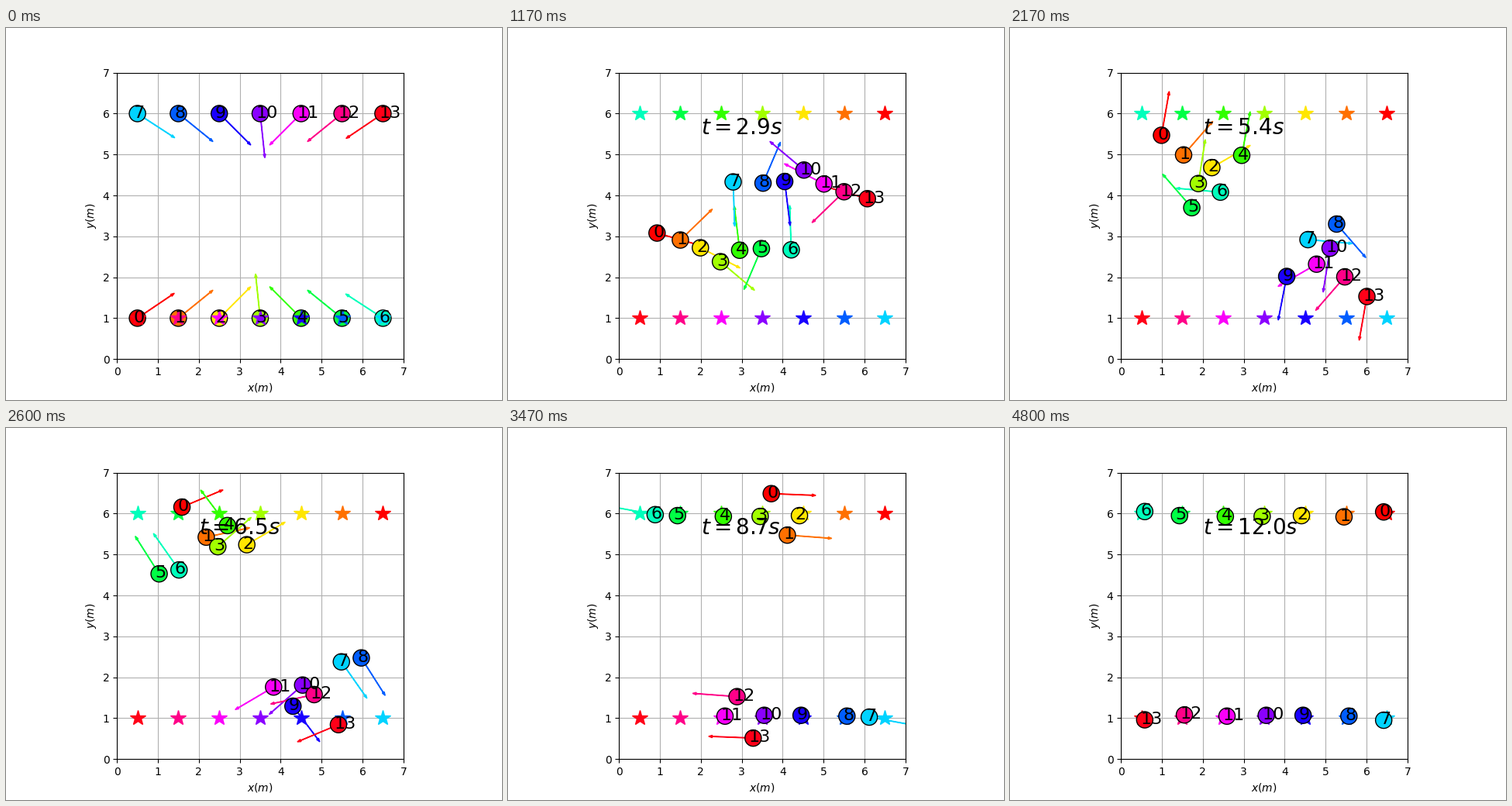
A matplotlib script for the animation above (4.83 s loop, 640 by 480 pixels).

```python
import math

import numpy as np
import matplotlib.pyplot as plt
from matplotlib.animation import FuncAnimation
from matplotlib.patches import Circle, FancyArrow

LOOP_MS, INTERVAL = 4830, 30
FRAMES = LOOP_MS // INTERVAL
SIZE = 7.0            # side of the square field in metres
ROBOTS = 14
HALF = ROBOTS // 2
TICKS = [0, 14, 29, 54, 76, 99]   # waypoint times in tenths of a second

START_HEADINGS = [34, 39, 45, 96, 135, 141, 147]
ARRIVALS = [115, 107, 80, 77, 68, 84, 90]
# x, y, heading in degrees; the last waypoint is the stop near the goal
WAYPOINTS = [
    [(1.47, 1.93, 74), (0.93, 3.08, -16), (0.99, 5.47, 80),
     (2.63, 6.41, 11), (4.91, 6.33, -12), (6.42, 6.04, -10)],
    [(2.25, 1.87, 173), (1.50, 2.91, 44), (1.53, 4.99, 49),
     (3.02, 5.49, 5), (5.31, 5.43, 3), (5.45, 5.92, 100)],
    [(2.75, 1.71, 148), (1.99, 2.72, -27), (2.22, 4.68, 30),
     (4.13, 5.79, 29), (4.41, 5.95, 30)],
    [(3.25, 1.59, 145), (2.48, 2.38, -40), (1.89, 4.29, 81),
     (3.39, 5.88, 37), (3.45, 5.93, 37)],
    [(3.82, 1.71, 170), (2.95, 2.66, 97), (2.95, 4.98, 79),
     (2.55, 5.93, 120)],
    [(4.63, 1.95, 163), (3.48, 2.70, -113), (1.73, 3.70, 131),
     (0.94, 5.43, 63), (1.43, 5.95, 20)],
    [(5.42, 1.84, 157), (4.21, 2.67, 92), (2.43, 4.08, 175),
     (1.45, 5.58, 57), (0.58, 6.05, 160)],
]


def direction(degrees):
    a = math.radians(degrees)
    return np.array([math.cos(a), math.sin(a)])


def hermite(p0, v0, p1, v1, span, u):
    """Position and velocity at share u of a cubic leg lasting span seconds."""
    m0, m1 = v0 * span, v1 * span
    pos = ((2 * u**3 - 3 * u**2 + 1) * p0 + (u**3 - 2 * u**2 + u) * m0
           + (3 * u**2 - 2 * u**3) * p1 + (u**3 - u**2) * m1)
    vel = (6 * (u**2 - u) * (p0 - p1) + (3 * u**2 - 4 * u + 1) * m0
           + (3 * u**2 - 2 * u) * m1) / span
    return pos, vel


def lower_pose(i, tick):
    """Place and unit heading of a robot from the bottom row."""
    points = [(i + 0.5, 1.0, START_HEADINGS[i])] + WAYPOINTS[i]
    times = TICKS[:len(points) - 1] + [ARRIVALS[i]]
    if tick >= times[-1]:
        return np.array(points[-1][:2]), None
    leg = max(n for n, t in enumerate(times) if t <= tick)
    (x0, y0, a0), (x1, y1, a1) = points[leg:leg + 2]
    span = times[leg + 1] - times[leg]
    pos, vel = hermite(np.array([x0, y0]), direction(a0),
                       np.array([x1, y1]), direction(a1),
                       span / 10, (tick - times[leg]) / span)
    return pos, vel / max(np.hypot(*vel), 1e-6)


def pose(i, tick):
    """The top row mirrors the bottom row through the field's centre."""
    if i < HALF:
        return lower_pose(i, tick)
    pos, head = lower_pose(ROBOTS - 1 - i, tick)
    return SIZE - pos, None if head is None else -head


def goal(i):
    return (6.5 - i, 6.0) if i < HALF else (13.5 - i, 1.0)


def tick_at(frame):
    """Simulation tick: 25 ticks a second shown on a 30 Hz clock."""
    shot = math.floor((frame * INTERVAL + INTERVAL / 2 + 5) * 3 / 100)
    return math.ceil(shot * 5 / 6 - 0.5)


fig, ax = plt.subplots(figsize=(6.4, 4.8), dpi=100)
ax.set_aspect("equal")
ax.set_xlim(0, SIZE)
ax.set_ylim(0, SIZE)
ax.set_xticks(range(8))
ax.set_yticks(range(8))
ax.set_xlabel("$x(m)$")
ax.set_ylabel("$y(m)$")
ax.set_axisbelow(True)
ax.grid(True)

discs, arrows, labels = [], [], []
for i in range(ROBOTS):
    color = plt.cm.hsv(i / (ROBOTS - 1))
    ax.plot(*goal(i), marker="*", markersize=15, color=color, zorder=2)
    arrows.append(ax.add_patch(FancyArrow(
        0, 0, 1, 0, width=0.01, head_width=0.06, head_length=0.09,
        color=color, zorder=1.5)))
    discs.append(ax.add_patch(Circle(
        (0, 0), 0.2, facecolor=color, edgecolor="black", zorder=3)))
    labels.append(ax.text(0, 0, str(i), fontsize=16, zorder=4))
clock = ax.text(2, 5.5, "", fontsize=20, zorder=5)


def update(frame):
    tick = tick_at(frame)
    for i, (disc, arrow, label) in enumerate(zip(discs, arrows, labels)):
        (x, y), head = pose(i, tick)
        disc.center = x, y
        # the bottom row starts underneath the goal stars
        disc.set_zorder(1.8 if tick == 0 and i < HALF else 3)
        label.set_position((x - 0.1, y - 0.1))
        arrow.set_visible(head is not None)
        if head is not None:
            arrow.set_data(x=x, y=y, dx=head[0], dy=head[1])
    clock.set_text(f"$t={tick / 10:.1f}s$" if tick else "")
    return discs + arrows + labels + [clock]


anim = FuncAnimation(fig, update, frames=FRAMES, interval=INTERVAL,
                     repeat=True, repeat_delay=0, blit=False)
plt.show()
```
